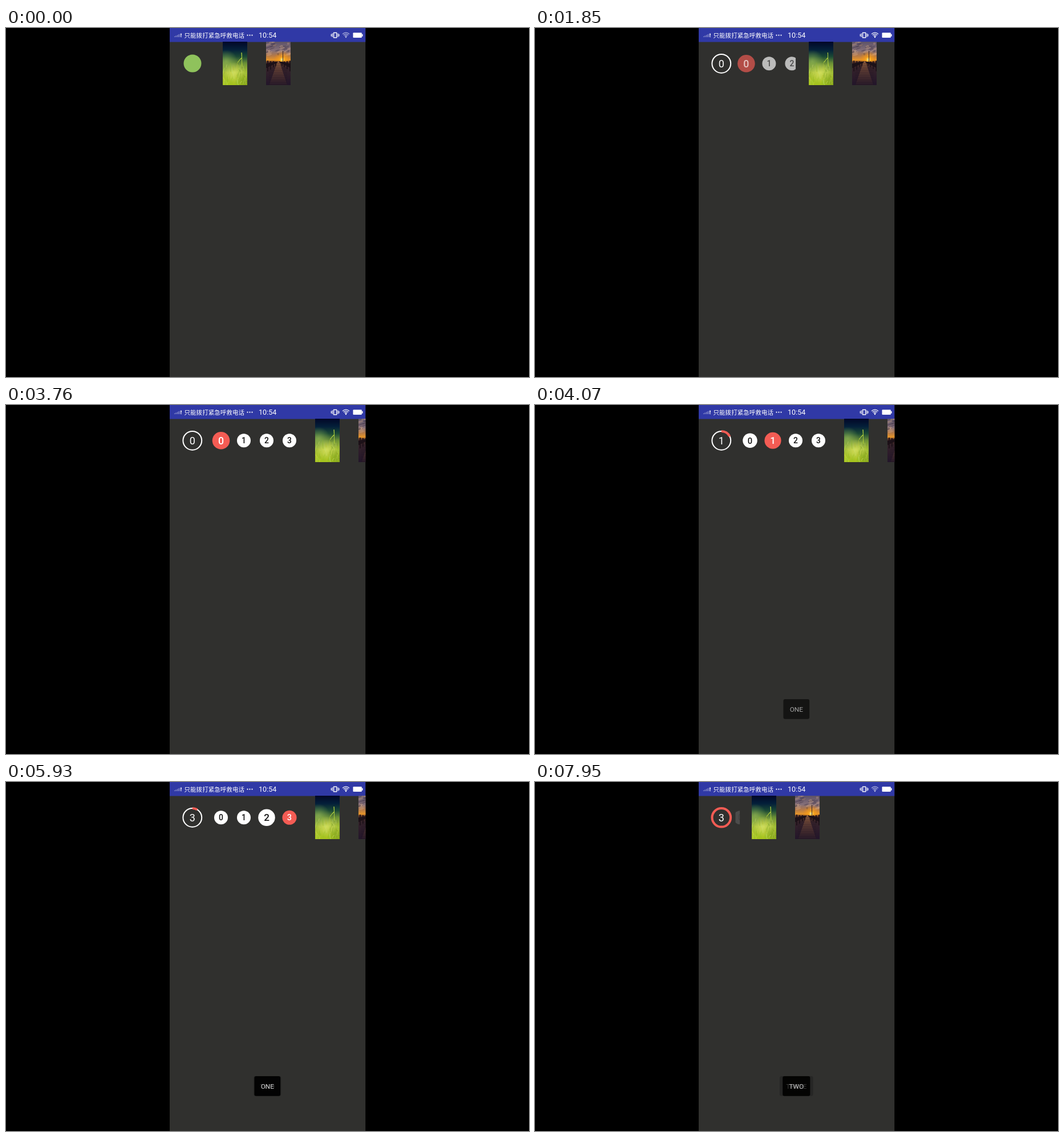
An HTML page with a canvas for the animation above (8000 ms loop, 917 by 611 pixels).

```html
<!DOCTYPE html>
<html lang="zh">
<head>
<meta charset="utf-8">
<style>
  html, body { margin: 0; width: 100%; height: 100%; overflow: hidden; background: #000; }
  canvas { display: block; }
</style>
</head>
<body>
<canvas id="stage" width="917" height="611"></canvas>
<script>
const LOOP = 8000;
const PHONE = { x: 287, w: 343.5, bar: 24.5 };
const RED = '#f45c54';
const ctx = document.getElementById('stage').getContext('2d');

const clamp = v => Math.max(0, Math.min(1, v));
const span = (t, start, length) => clamp((t - start) / length);
const easeOut = u => 1 - (1 - u) ** 2;
const easeInOut = u => (1 - Math.cos(Math.PI * u)) / 2;

function random(seed) {
  return () => (seed = (seed * 16807) % 2147483647) / 2147483647;
}

function disc(c, x, y, r, fill) {
  c.fillStyle = fill;
  c.beginPath();
  c.arc(x, y, r, 0, 2 * Math.PI);
  c.fill();
}

function glow(c, x, y, r, inner, outer) {
  const light = c.createRadialGradient(x, y, 0, x, y, r);
  light.addColorStop(0, inner);
  light.addColorStop(1, outer);
  disc(c, x, y, r, light);
}

function polygon(c, fill, points) {
  c.fillStyle = fill;
  c.beginPath();
  points.forEach(([x, y]) => c.lineTo(x, y));
  c.fill();
}

function arc(x, y, r, from, to, width, color) {
  ctx.strokeStyle = color;
  ctx.lineWidth = width;
  ctx.beginPath();
  ctx.arc(x, y, r, from, to);
  ctx.stroke();
}

function label(text, x, y, size, color = '#fff', weight = 400, align = 'center') {
  ctx.font = `${weight} ${size}px Roboto, "Noto Sans CJK SC", "Noto Sans CJK", sans-serif`;
  ctx.textAlign = align;
  ctx.fillStyle = color;
  ctx.fillText(text, x, y);
}

// Pictures are painted once at 4x and scaled down when drawn.
function picture(stops, paint) {
  const canvas = document.createElement('canvas');
  canvas.width = 43 * 4;
  canvas.height = 76 * 4;
  const c = canvas.getContext('2d');
  c.scale(4, 4);
  const sky = c.createLinearGradient(0, 0, 0, 76);
  stops.forEach(([at, color]) => sky.addColorStop(at, color));
  c.fillStyle = sky;
  c.fillRect(0, 0, 43, 76);
  paint(c);
  return canvas;
}

const meadow = picture(
  [[0, '#020828'], [.18, '#04203a'], [.34, '#1c4a35'], [.5, '#6c9038'], [.7, '#a9c23c'], [1, '#a6c41c']],
  c => {
    glow(c, 6, 34, 20, '#9cc05a99', '#9cc05a00');
    glow(c, 40, 70, 18, '#5f851880', '#5f851800');
    glow(c, 20, 54, 18, '#e4ea6aaa', '#e4ea6a00');
    const rnd = random(41);
    c.lineWidth = 1.2;
    for (let i = 0; i < 60; i++) {
      const x = rnd() * 43, y = 44 + rnd() * 36, h = 4 + rnd() * 9;
      c.strokeStyle = `hsla(${62 + rnd() * 20}, 65%, ${35 + rnd() * 35}%, .35)`;
      c.beginPath();
      c.moveTo(x, y);
      c.quadraticCurveTo(x, y - h / 2, x + rnd() * 8 - 4, y - h);
      c.stroke();
    }
    c.strokeStyle = '#a9c83c';
    c.beginPath();
    c.moveTo(34, 44);
    c.lineTo(33, 19);
    c.moveTo(33, 28);
    c.lineTo(26, 36);
    c.stroke();
  });

const pier = picture(
  [[0, '#5f5468'], [.2, '#86707a'], [.32, '#b57a48'], [.42, '#e8962a'], [.46, '#5a3426'], [.6, '#35222a'], [1, '#23162a']],
  c => {
    const rnd = random(7);
    for (let i = 0; i < 30; i++) {
      const y = rnd() * 24;
      c.fillStyle = rnd() < .5 ? 'rgba(55,45,65,.35)' : 'rgba(225,180,140,.28)';
      c.beginPath();
      c.ellipse(rnd() * 43, y, 2 + rnd() * 5, 1 + rnd() * 1.2, -.3, 0, 2 * Math.PI);
      c.fill();
    }
    c.save();
    c.rect(0, 0, 43, 35);
    c.clip();
    glow(c, 28, 31, 15, '#ffb020', '#ff900000');
    glow(c, 28, 31, 5, '#fff6b0', '#ffd04000');
    c.restore();
    const deck = c.createLinearGradient(0, 34, 0, 76);
    deck.addColorStop(0, '#8a5a3c');
    deck.addColorStop(.4, '#5a3a34');
    deck.addColorStop(1, '#281a2a');
    polygon(c, deck, [[20, 34], [23, 34], [37, 76], [5, 76]]);
    c.fillStyle = 'rgba(25,14,20,.3)';
    for (let y = 38; y < 76; y += 3) c.fillRect(5, y, 32, .8);
    polygon(c, '#1c1118', [[0, 38], [20, 34], [20, 36], [0, 46]]);
    polygon(c, '#1c1118', [[43, 38], [23, 34], [23, 36], [43, 46]]);
    for (const x of [2, 7, 12, 16, 27, 31, 36, 41]) {
      const reach = Math.abs(x - 22);
      c.fillRect(x, 35 - reach * .1, 1.3, 3 + reach * .8);
    }
    c.fillStyle = '#33232a';
    c.fillRect(28.5, 16, 1, 19);
  });

function statusBar(t) {
  ctx.fillStyle = '#3039a6';
  ctx.fillRect(PHONE.x, 0, PHONE.w, PHONE.bar);

  ctx.fillStyle = 'rgba(255,255,255,.4)';
  for (let i = 0; i < 5; i++) ctx.fillRect(295 + i * 2.5, 14.5 - i * 1.2, 1.5, 1.5 + i * 1.2);
  ctx.fillStyle = '#fff';
  ctx.fillRect(306.7, 9.5, 1.2, 4);
  ctx.fillRect(306.7, 14.7, 1.2, 1.3);

  label('只能拨打紧急呼救电话', 312.5, 16.5, 10.55, '#fff', 400, 'left');
  for (let i = 0; i < 3; i++) disc(ctx, 423.5 + i * 4, 12.7, 1.1, '#fff');
  label('10:54', 443, 17.4, 12.6, '#fff', 400, 'left');

  ctx.strokeStyle = '#fff';
  ctx.lineWidth = 1.4;
  ctx.strokeRect(574.6, 8.3, 5, 8.6);
  ctx.fillStyle = '#fff';
  for (const [x, h] of [[569.7, 4], [571.7, 6.5], [581.3, 6.5], [583.3, 4]])
    ctx.fillRect(x, 12.6 - h / 2, 1.2, h);

  ctx.globalAlpha = t < 1640 || t >= 7220 ? .65 : 1;
  for (const r of [3, 5.7, 8.4])
    arc(596, 16.6, r, -Math.PI * .75, -Math.PI * .25, 1.3, '#fff');
  disc(ctx, 596, 16, 1.2, '#fff');
  ctx.globalAlpha = 1;

  ctx.fillStyle = '#fff';
  ctx.beginPath();
  ctx.roundRect(608.5, 8.3, 15.3, 8.8, 1);
  ctx.fill();
  ctx.fillRect(624, 10.7, 1.6, 4);
}

const selections = [
  { item: 0, at: 0 },
  { item: 1, at: 3880 },
  { item: 2, at: 4900 },
  { item: 3, at: 5900 },
];
const SELECT_TIME = 360;

function selectionAt(t) {
  const item = selections.filter(s => t >= s.at).length - 1;
  return { item, progress: item ? span(t, selections[item].at, SELECT_TIME) : 1 };
}

function ring({ item, progress }) {
  const x = 326.8, y = 62.3, top = -Math.PI / 2;
  arc(x, y, 16.4, 0, 2 * Math.PI, 2, '#fff');
  const sweep = 2 * Math.PI * item / 3 * progress;
  if (sweep) arc(x, y, 16.3, top, top + sweep, 4, RED);
  label(item, x, y + 6.5, 18);
}

function drawerOpening(t) {
  if (t < 6950) return easeInOut(span(t, 1640, 360));
  if (t < 7220) return 1 - easeInOut(span(Math.min(t, 7070), 6950, 270));
  return t < 7930 ? 0 : .04;
}

function drawer(open, { item, progress }) {
  if (!open) return;
  ctx.save();
  ctx.beginPath();
  ctx.rect(351.5, 24, 1 + 165 * open, 80);
  ctx.clip();
  ctx.globalAlpha = .1 + .9 * open;
  const grown = easeOut(progress);
  for (let i = 0; i < 4; i++) {
    const active = i === item;
    const size = active ? grown : i === item - 1 ? 1 - grown : 0;
    const r = 12 + 3.3 * size;
    const x = 377 + 40 * i - 18 * (1 - open);
    disc(ctx, x, 62.3, r, active ? RED : '#fff');
    label(i, x, 62.3 + r * .41, r * 1.16, active ? '#fff' : '#111', 500);
  }
  ctx.restore();
}

const toasts = [
  { text: 'ONE', from: 3870, to: 5880 },
  { text: 'TWO', from: 5880, to: 7890 },
  { text: 'THREE', from: 7890, to: 9900 },
];

function toast({ text, from, to }, t) {
  const alpha = easeOut(span(t, from, 520)) * (1 - span(t, to, 400) ** 2);
  if (!alpha) return;
  ctx.globalAlpha = alpha;
  ctx.font = '400 11.8px Roboto, sans-serif';
  const w = ctx.measureText(text).width + 22.5;
  ctx.fillStyle = 'rgba(0,0,0,.93)';
  ctx.beginPath();
  ctx.roundRect(458.3 - w / 2, 515, w, 34.7, 3);
  ctx.fill();
  label(text, 458.3, 536.6, 11.8);
  ctx.globalAlpha = 1;
}

function draw(t) {
  ctx.fillStyle = '#000';
  ctx.fillRect(0, 0, 917, 611);
  ctx.save();
  ctx.beginPath();
  ctx.rect(PHONE.x, 0, PHONE.w, 611);
  ctx.clip();
  ctx.fillStyle = '#30302e';
  ctx.fillRect(PHONE.x, 0, PHONE.w, 611);
  statusBar(t);

  const open = drawerOpening(t);
  const selection = selectionAt(t);
  const shift = 162 * clamp((open - .04) / .96);
  ctx.drawImage(meadow, 380 + shift, 24.3, 43, 76);
  ctx.drawImage(pier, 456.3 + shift, 24.3, 43, 76);
  drawer(open, selection);
  if (t < 1640) disc(ctx, 327, 62, 15.5, '#8fc25c');
  else ring(selection);
  toasts.forEach(item => toast(item, t));
  ctx.restore();
}

function frame() {
  draw(performance.now() % LOOP);
  requestAnimationFrame(frame);
}
frame();
</script>
</body>
</html>
```
